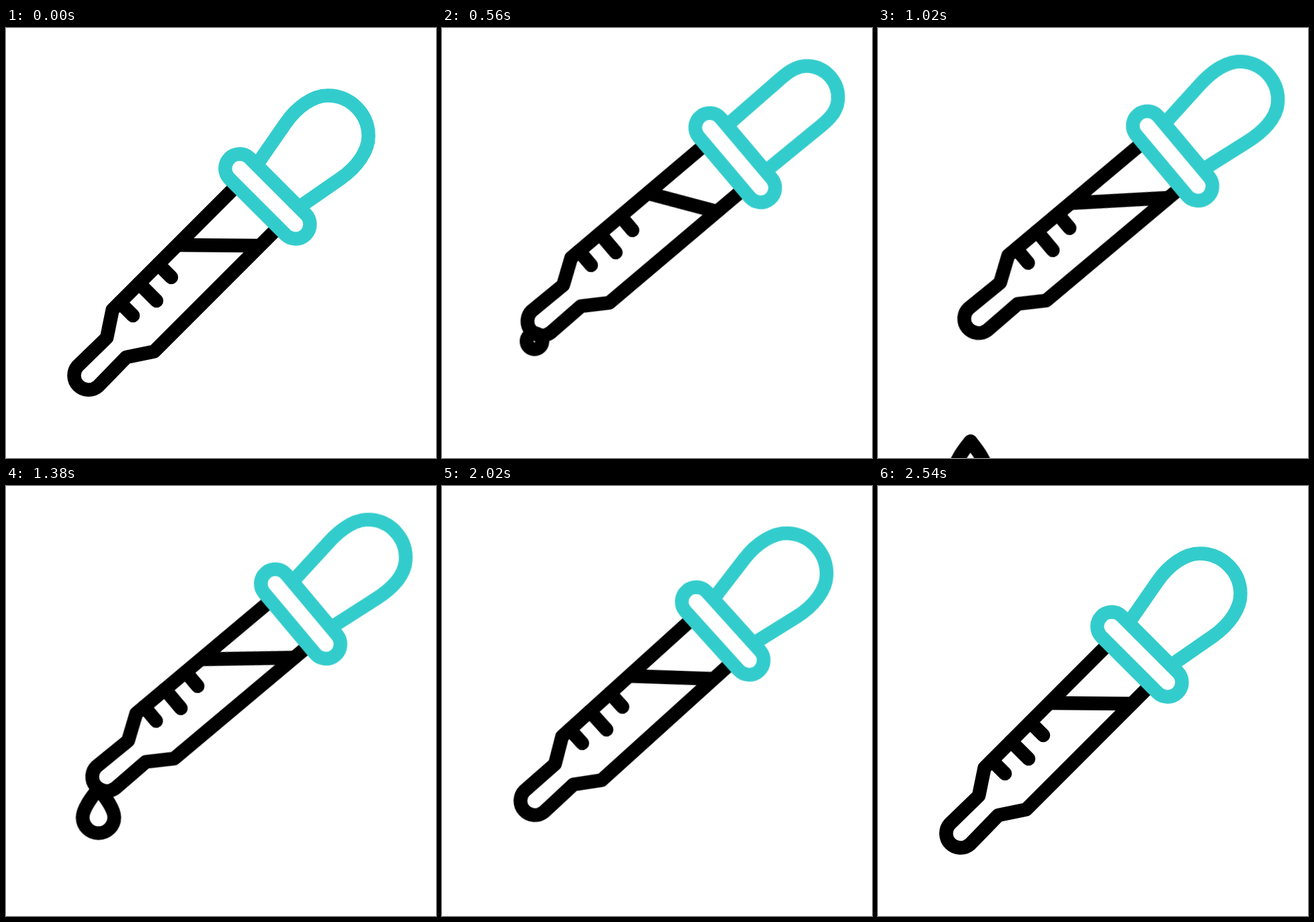
These frames come from a looping animation (640 by 640 pixels, 3.6 s). An HTML page:

```html
<!DOCTYPE html>
<html lang="en">
<head>
<meta charset="utf-8">
<title>Dropper</title>
<style>
  html, body { margin: 0; width: 100%; height: 100%; overflow: hidden; background: #fff; }
  svg { display: block; width: 100vw; height: 100vh; }
  path {
    fill: none;
    stroke: #000;
    stroke-width: 20.5;
    stroke-linejoin: round;
  }
  .teal { stroke: #33cccc; }
  .round { stroke-linecap: round; }

  .dropper, .level, .bulb, .drop {
    animation-duration: 3.6s;
    animation-iteration-count: infinite;
  }
  .dropper { transform-origin: 320px 320px; animation-name: lift; }
  .level { animation-name: slosh; }
  .bulb { animation-name: squeeze; animation-timing-function: cubic-bezier(.333, 0, .667, 1); }
  .drop { opacity: 0; animation-name: show, fall, grow; animation-timing-function: linear; }
  .second { animation-delay: .66s; }

  @keyframes lift {
    0% { transform: translate(0, 0) rotate(0deg); animation-timing-function: cubic-bezier(.25, 0, .1, 1); }
    22% { transform: translate(43.4px, -66.5px) rotate(5deg); }
    44.444% {
      transform: translate(43.4px, -66.5px) rotate(5deg);
      animation-timing-function: cubic-bezier(.333, 0, .667, 1);
    }
    70.556%, 100% { transform: translate(0, 0) rotate(0deg); }
  }

  /* both ends slide along the tube walls */
  @keyframes slosh {
    0% { d: path("M255 323L378 324"); animation-timing-function: cubic-bezier(.3, 0, .5, 1); }
    15% { d: path("M263.8 314.2L369.2 332.8"); }
    16.4% { d: path("M263.8 314.2L369.2 332.8"); animation-timing-function: cubic-bezier(.333, 0, .667, 1); }
    28.9% { d: path("M244.1 333.9L388.9 313.1"); animation-timing-function: cubic-bezier(.3, .3, .55, 1); }
    70.556%, 100% { d: path("M255 323L378 324"); }
  }

  @keyframes squeeze {
    0%, 7.5%, 22.5%, 26.1%, 41%, 100% {
      d: path("M373 204L416 142C433 117.5 457 100.5 479 100.5C512.4 100.5 539.5 127.6 539.5 161C539.5 183 522.5 207 498 224L436 267");
    }
    15%, 33.333% {
      d: path("M373 204L432 143.5C451 124 465 105.5 487.5 105.5C513.5 105.5 534.5 126.5 534.5 152.5C534.5 175 516 189 496.5 208L436 267");
    }
  }

  @keyframes show {
    0%, 13.33% { opacity: 0; }
    13.34%, 30.5% { opacity: 1; }
    30.51%, 100% { opacity: 0; }
  }

  @keyframes fall {
    0%, 13.333% { transform: translate(137.6px, 452px); }
    15% { transform: translate(137.6px, 466px); animation-timing-function: cubic-bezier(.333, 0, .667, .333); }
    30.556%, 100% { transform: translate(137.6px, 726.3px); }
  }

  /* bead that swells into a teardrop */
  @keyframes grow {
    0%, 13.333% {
      d: path("M0 -1C.55 -1 1 -.55 1 0C1 .55 .55 1 0 1C-.55 1 -1 .55 -1 0C-1 -.55 -.55 -1 0 -1Z");
    }
    15.556% {
      d: path("M0 -11.6C6.4 -11.6 11.6 -6.4 11.6 0C11.6 6.4 6.4 11.6 0 11.6C-6.4 11.6 -11.6 6.4 -11.6 0C-11.6 -6.4 -6.4 -11.6 0 -11.6Z");
    }
    18%, 100% {
      d: path("M0 -43C5 -36 23.5 -15 23.5 0C23.5 13 13 23.5 0 23.5C-13 23.5 -23.5 13 -23.5 0C-23.5 -15 -5 -36 0 -43Z");
    }
  }
</style>
</head>
<body>
<svg viewBox="0 0 640 640">
  <path class="drop" d="M0 -43C5 -36 23.5 -15 23.5 0C23.5 13 13 23.5 0 23.5C-13 23.5 -23.5 13 -23.5 0C-23.5 -15 -5 -36 0 -43Z"/>
  <path class="drop second" d="M0 -43C5 -36 23.5 -15 23.5 0C23.5 13 13 23.5 0 23.5C-13 23.5 -23.5 13 -23.5 0C-23.5 -15 -5 -36 0 -43Z"/>

  <g class="dropper">
    <path class="level" d="M255 323L378 324"/>
    <path d="M343.2 234.8L158.500 419.500L150 461L106.700 503.100A21.400 21.400 0 0 0 136.900 533.300L179 490L220.500 481.500L405.200 296.800"/>
    <path class="round" d="M226.500 351.500L246 371M198 380L224 406M169.500 408.500L189 428"/>
    <path class="teal bulb" d="M373 204L416 142C433 117.5 457 100.5 479 100.5C512.4 100.5 539.5 127.6 539.5 161C539.5 183 522.5 207 498 224L436 267"/>
    <path class="teal" d="M362.700 193.600L446.400 277.300A21.500 21.500 0 0 1 416 307.700L332.300 224A21.500 21.500 0 0 1 362.700 193.600Z"/>
  </g>
</svg>
</body>
</html>
```
